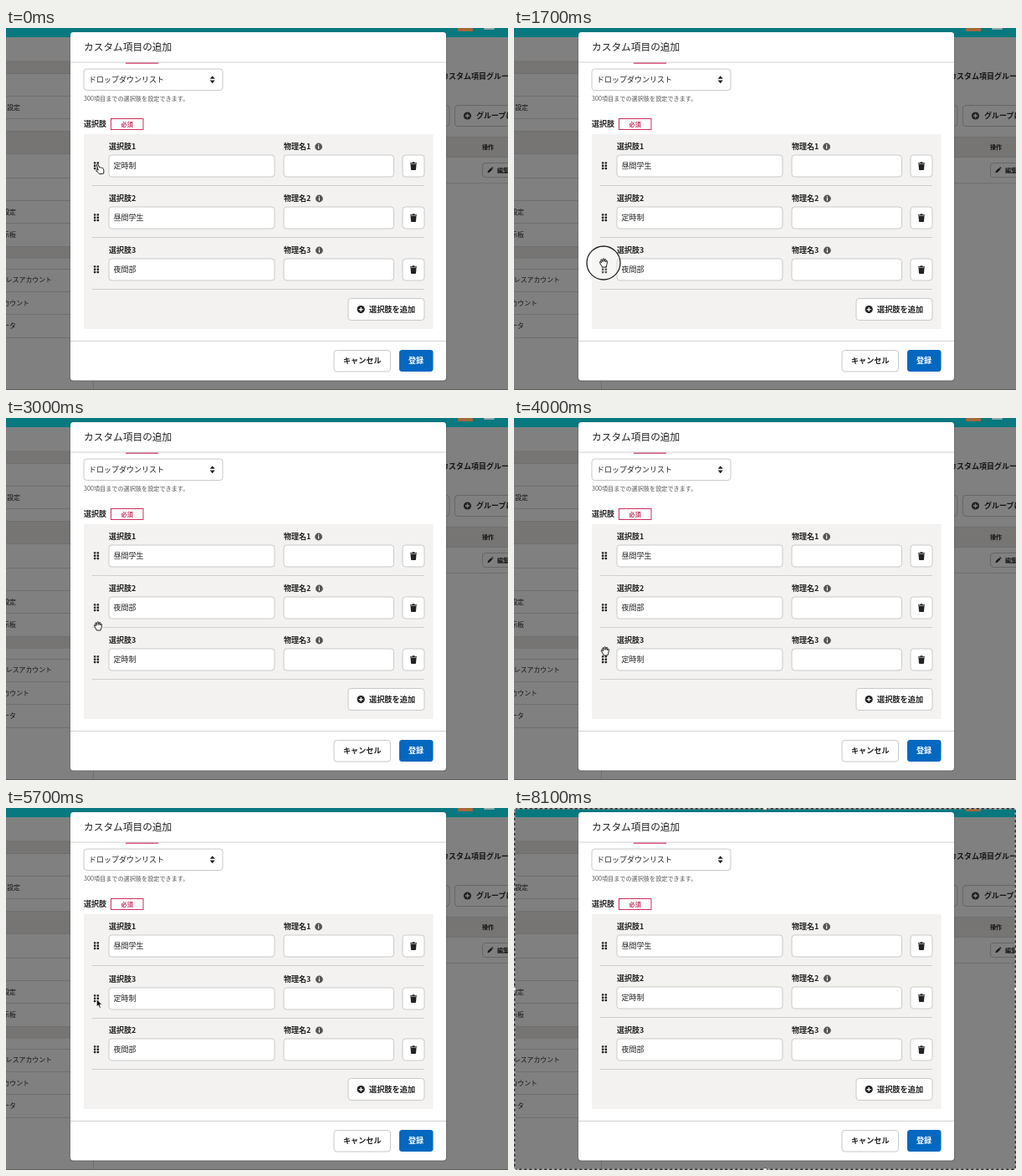
These frames come from a looping animation (600x433 px, 8.2 s). An HTML page:

```html
<!DOCTYPE html>
<html lang="ja">
<head>
<meta charset="utf-8">
<title>カスタム項目の追加</title>
<style>
html, body { margin: 0; width: 100%; height: 100%; overflow: hidden; background: #7f7f7f; }
svg { display: block; width: 600px; height: 433px; font-family: "Noto Sans CJK JP", "Noto Sans CJK", sans-serif; }
</style>
</head>
<body>
<svg id="stage" viewBox="0 0 600 433" xmlns="http://www.w3.org/2000/svg"></svg>
<script>
const LOOP = 8200, STEP = 100, PITCH = 62;
const INK = '#222', EDGE = '#c9c9c9', RED = '#cb2e5c';
const stage = document.getElementById('stage');

// Drawing helpers
function el(parent, tag, attrs, text) {
  const node = document.createElementNS('http://www.w3.org/2000/svg', tag);
  for (const key in attrs) node.setAttribute(key, attrs[key]);
  if (text !== undefined) node.textContent = text;
  parent.appendChild(node);
  return node;
}
const rect = (p, x, y, width, height, fill, more) => el(p, 'rect', { x, y, width, height, fill, ...more });
const line = (p, x, y, width, fill, height = 1) => rect(p, x, y, width, height, fill);
const path = (p, d, fill, more) => el(p, 'path', { d, fill, ...more });
const disc = (p, cx, cy, r, fill, more) => el(p, 'circle', { cx, cy, r, fill, ...more });
// Text is placed by its left edge and vertical middle
const label = (p, x, mid, size, text, more) =>
  el(p, 'text', { x, y: mid + size * 0.37, 'font-size': size, fill: INK, ...more }, text);
const bold = { 'font-weight': 700 };
const box = (p, x, y, w, h, fill = '#fff', stroke = EDGE) =>
  rect(p, x, y, w, h, fill, { rx: 3.5, stroke, 'stroke-width': 1 });

function plusIcon(p, x, y, fill) {
  disc(p, x, y, 4.6, INK);
  path(p, `M${x - 2.5} ${y}h5M${x} ${y - 2.5}v5`, 'none', { stroke: fill, 'stroke-width': 1.3 });
}

function drawPage(p) {
  const dark = '#151515', rule = '#6f6f6f', band = '#777573', dim = '#808080';
  rect(p, 0, 0, 600, 433, dim);
  rect(p, 0, 0, 600, 11, '#07797f');
  rect(p, 540, 0, 18, 4, '#a5683a', { rx: 1 });
  rect(p, 571, 0, 13, 2, '#8fa9aa', { rx: 1 });

  line(p, 104, 11, 1, rule, 422);
  for (const y of [39, 123, 261]) rect(p, 0, y, 104, y === 123 ? 27 : 15, band);
  for (const y of [54, 81, 108, 123, 150, 179, 206, 233, 261, 288, 315, 342, 370]) line(p, 0, y, 104, rule);
  const menu = [[17, 95, '設定'], [12, 220, '設定'], [12, 247, '示板'],
    [55, 301, 'レスアカウント'], [28, 329, 'カウント'], [12, 356, 'ータ']];
  for (const [x, y, text] of menu) label(p, x, y, 7.9, text, { 'text-anchor': 'end', fill: dark });

  label(p, 520, 58, 9, 'カスタム項目グループ', { ...bold, fill: dark });
  box(p, 500, 92.5, 30, 25, dim, '#666');
  box(p, 536.5, 92.5, 90, 25, dim, '#666');
  plusIcon(p, 551.5, 105, dim);
  label(p, 562, 105, 9, 'グループに追加', { ...bold, fill: dark });
  rect(p, 526, 130, 74, 24, band);
  line(p, 526, 130, 74, rule);
  line(p, 526, 154, 74, rule);
  label(p, 569, 142, 7.1, '操作', { ...bold, fill: dark });
  box(p, 569.5, 161.5, 50, 17, dim, '#666');
  path(p, 'M575.5 173.3l.5-2.2 3.8-3.8 1.7 1.7-3.8 3.8zM580.3 166.8l.7-.7 1.7 1.7-.7.7z', dark);
  label(p, 587, 170.3, 7.1, '編集', { ...bold, fill: dark });
  line(p, 526, 185, 74, rule);
  line(p, 0, 432, 600, '#5c5c5c');
}

function drawDialog(p) {
  rect(p, 76, 5, 451, 418, '#000', { rx: 4, opacity: 0.12 });
  rect(p, 77, 5, 449, 416.5, '#fff', { rx: 3.5 });
  label(p, 93, 22.3, 11.7, 'カスタム項目の追加', { 'font-weight': 500 });
  line(p, 77, 40.5, 449, '#d2d2d2');
  line(p, 143, 41.5, 39, RED, 1.2);
  box(p, 93, 49, 166, 25.5);
  label(p, 99, 61.7, 9, 'ドロップダウンリスト');
  path(p, 'M243.6 60.8l3.1-3.6 3.1 3.6zM243.6 62.6l3.1 3.6 3.1-3.6z', INK);
  label(p, 93, 84, 7.15, '300項目までの選択肢を設定できます。', { fill: '#555' });
  label(p, 93, 115, 9, '選択肢', bold);
  rect(p, 125.5, 108.5, 38.5, 13, '#fff', { stroke: RED });
  label(p, 137.5, 115.2, 7.2, '必須', { ...bold, fill: RED });
  rect(p, 93, 127, 417.5, 233, '#f3f2f0');
  box(p, 409, 323.5, 91, 26);
  plusIcon(p, 424.2, 336.6, '#fff');
  label(p, 434, 336.6, 9.2, '選択肢を追加', bold);
  line(p, 77, 374, 449, '#d2d2d2');
  box(p, 392, 385.5, 67.5, 25.5);
  label(p, 403, 398, 9.1, 'キャンセル', bold);
  rect(p, 470, 385, 40.5, 26, '#0468c0', { rx: 3.5 });
  label(p, 481, 398, 9.1, '登録', { ...bold, fill: '#fff' });
}

function makeRow(p, value) {
  const g = el(p, 'g', {});
  const choice = label(g, 123, 142, 9, '', bold);
  const name = label(g, 332, 142, 9, '', bold);
  const info = el(g, 'g', {});
  disc(info, 373.6, 142, 4.4, '#555');
  path(info, 'M373 141.2h1.2v3.2h-1.2zM373 139.2h1.2v1.2h-1.2z', '#fff');
  box(g, 123, 152, 198, 26);
  label(g, 128.5, 165, 9, value);
  box(g, 332, 152, 131.5, 26);
  box(g, 474, 152, 26, 26);
  path(g, 'M483 161.2h8v1.2h-8zM485.6 160.2h2.8v1h-2.8zM483.5 163h7l-.5 6.2q-.1.8-.9.8h-4.2q-.8 0-.9-.8z', INK);
  for (const x of [104.9, 108.6])
    for (const y of [160.2, 163.5, 166.8]) rect(g, x, y, 2.5, 2.4, INK, { rx: 0.6 });
  line(g, 103, 188, 397, '#cfcfcf');
  return { g, choice, name, info };
}

function drawSelection(p) {
  const frame = { x: 0.75, y: 0.75, width: 598.5, height: 431.5, fill: 'none', 'stroke-width': 1.5 };
  el(p, 'rect', { ...frame, stroke: '#a8a8a8' });
  el(p, 'rect', { ...frame, stroke: '#2c2c2c', 'stroke-dasharray': '3 3' });
  for (const x of [0, 300, 600])
    for (const y of [0, 216.5, 433])
      if (x !== 300 || y !== 216.5) disc(p, x, y, 2.6, '#e8e8e8', { stroke: '#555', 'stroke-width': 0.8 });
}

const cursorShapes = {
  pointer: 'M-3.6-5Q-2.6-6.2-1.7-4.8L-.3-1.6Q.6-2.4 1.3-1.4Q2.2-2 2.8-1Q4-1.4 4.4-.2Q5.4 2.4 4.6 5.6L-.2 6.2Q-1.6 4.2-4 2.6Q-4.8 1.2-3.4 1L-1.8 1.6Z',
  open: 'M-3.8 1Q-5.2-1-4.2-1.6Q-3.2-1.7-2.5 0L-3.3-3.2Q-3-4.6-2-4L-1.2-1.5L-1-4.8Q0-6 .6-4.8L.8-1.6L1.6-4.4Q2.7-5 2.9-3.8L2.7-1L3.5-2.6Q4.7-2.8 4.6-1.6Q4.2 2 3 5L-1.6 5Q-2.5 3-3.8 1Z',
  fist: 'M-3.2-.8Q-3.4-3.4-1.8-3Q-.8-4.2.2-3.2Q1.4-4 2.2-2.8Q3.9-3 3.9-1Q3.9 2 2.7 4L-1.8 4Q-4.4 1.6-4.4.3Q-4.3-1-3.2-.8ZM-1.6-2.4v1.6M.3-2.6v1.7M2.1-2.3v1.6',
  arrow: 'M0 0L0 9.4L2.1 7.5L3.6 11L5.3 10.3L3.8 6.9L6.7 6.8Z'
};

// Timeline: cursor stops [time, x, y] and cursor shapes [from, name]
const stops = [
  [100, 112, 168.5], [300, 105, 171], [500, 105, 171], [900, 104.5, 235], [1050, 104.5, 235],
  [1400, 107, 281], [1900, 107, 281], [2200, 108, 231], [2400, 108, 219], [2700, 108, 220],
  [3000, 110, 249], [3600, 109, 277], [3800, 109, 277], [4600, 108.2, 289.5], [5000, 108.2, 289.5],
  [5500, 108.2, 228.5]
];
const shapes = [[0, 'pointer'], [200, 'open'], [500, 'fist'], [1100, 'open'], [1900, 'fist'],
  [2600, 'open'], [5100, 'fist'], [5600, 'arrow']];
const presses = [[100, 1000], [1400, 2500], [4700, 5500]];
const drags = [
  { row: 0, other: 1, dir: 1, grab: 500, swap: 640, drop: 1000 },
  { row: 2, other: 0, dir: -1, grab: 1900, swap: 2040, drop: 2500 },
  { row: 0, other: 2, dir: -1, grab: 5000, swap: 5250, drop: 5700 }
];

const clamp = v => Math.max(0, Math.min(1, v));
const smooth = k => k * k * (3 - 2 * k);
const easeOut = k => 1 - (1 - k) * (1 - k);

function cursorAt(t) {
  let a = stops[0];
  for (const b of stops) {
    if (t < b[0]) {
      const k = smooth(clamp((t - a[0]) / (b[0] - a[0])));
      return { x: a[1] + (b[1] - a[1]) * k, y: a[2] + (b[2] - a[2]) * k };
    }
    a = b;
  }
  return { x: a[1], y: a[2] };
}

drawPage(el(stage, 'g', {}));
drawDialog(el(stage, 'g', {}));
const list = el(stage, 'g', {});
const rows = ['定時制', '昼間学生', '夜間部'].map(value => makeRow(list, value));
const ring = disc(stage, 0, 0, 20, '#fff', { 'fill-opacity': 0.25, stroke: '#222', 'stroke-width': 1.3 });
const cursor = path(stage, '', '#fff', { stroke: '#111', 'stroke-width': 0.9, 'stroke-linejoin': 'round' });
const selection = el(stage, 'g', {});
drawSelection(selection);
let topRow = -1;

function placeRows(t) {
  const slot = [0, 1, 2], number = [1, 2, 3];
  const x = [0, 0, 0], y = [0, 0, 0];
  let held = 0;
  for (const d of drags) {
    if (t < d.grab) break;
    held = d.row;
    const settle = smooth(clamp((t - d.drop) / 200));
    const from = cursorAt(d.grab), now = cursorAt(Math.min(t, d.drop));
    x[d.row] = (now.x - from.x) * (1 - settle);
    y[d.row] = (now.y - from.y) * (1 - settle) + d.dir * PITCH * settle;
    y[d.other] = -d.dir * PITCH * easeOut(clamp((t - d.swap) / 250));
    if (t >= d.drop + 200) {
      slot[d.row] += d.dir;
      slot[d.other] -= d.dir;
      number[d.row] = slot[d.row] + 1;
      number[d.other] = slot[d.other] + 1;
      x[d.row] = y[d.row] = y[d.other] = 0;
    }
  }
  rows.forEach((row, i) => {
    row.g.setAttribute('transform', `translate(${x[i]} ${slot[i] * PITCH + y[i]})`);
    row.choice.textContent = '選択肢' + number[i];
    row.name.textContent = '物理名' + number[i];
    row.info.setAttribute('transform', `translate(${number[i] > 1 ? 0.8 : 0} 0)`);
  });
  if (held !== topRow) {
    list.appendChild(rows[held].g);
    topRow = held;
  }
}

function render(t) {
  placeRows(t);
  const at = cursorAt(t);
  const shape = shapes.filter(s => s[0] <= t).pop()[1];
  cursor.setAttribute('d', cursorShapes[shape]);
  cursor.setAttribute('fill', shape === 'arrow' ? '#111' : '#fff');
  cursor.setAttribute('stroke', shape === 'arrow' ? '#fff' : '#111');
  cursor.setAttribute('transform', `translate(${at.x} ${at.y})`);
  cursor.setAttribute('opacity', 1 - clamp((t - 7300) / 300));

  let shown = 0;
  for (const [down, up] of presses)
    shown = Math.max(shown, Math.min(clamp((t - down) / 200), 1 - clamp((t - up) / 200)));
  ring.setAttribute('cx', at.x);
  ring.setAttribute('cy', at.y);
  ring.setAttribute('r', 24 - 4 * shown);
  ring.setAttribute('opacity', shown);
  selection.setAttribute('visibility', t >= 7000 ? 'visible' : 'hidden');
}

const start = performance.now();
function tick() {
  const t = (performance.now() - start) % LOOP;
  render(Math.floor(t / STEP) * STEP);
  requestAnimationFrame(tick);
}
tick();
</script>
</body>
</html>
```
